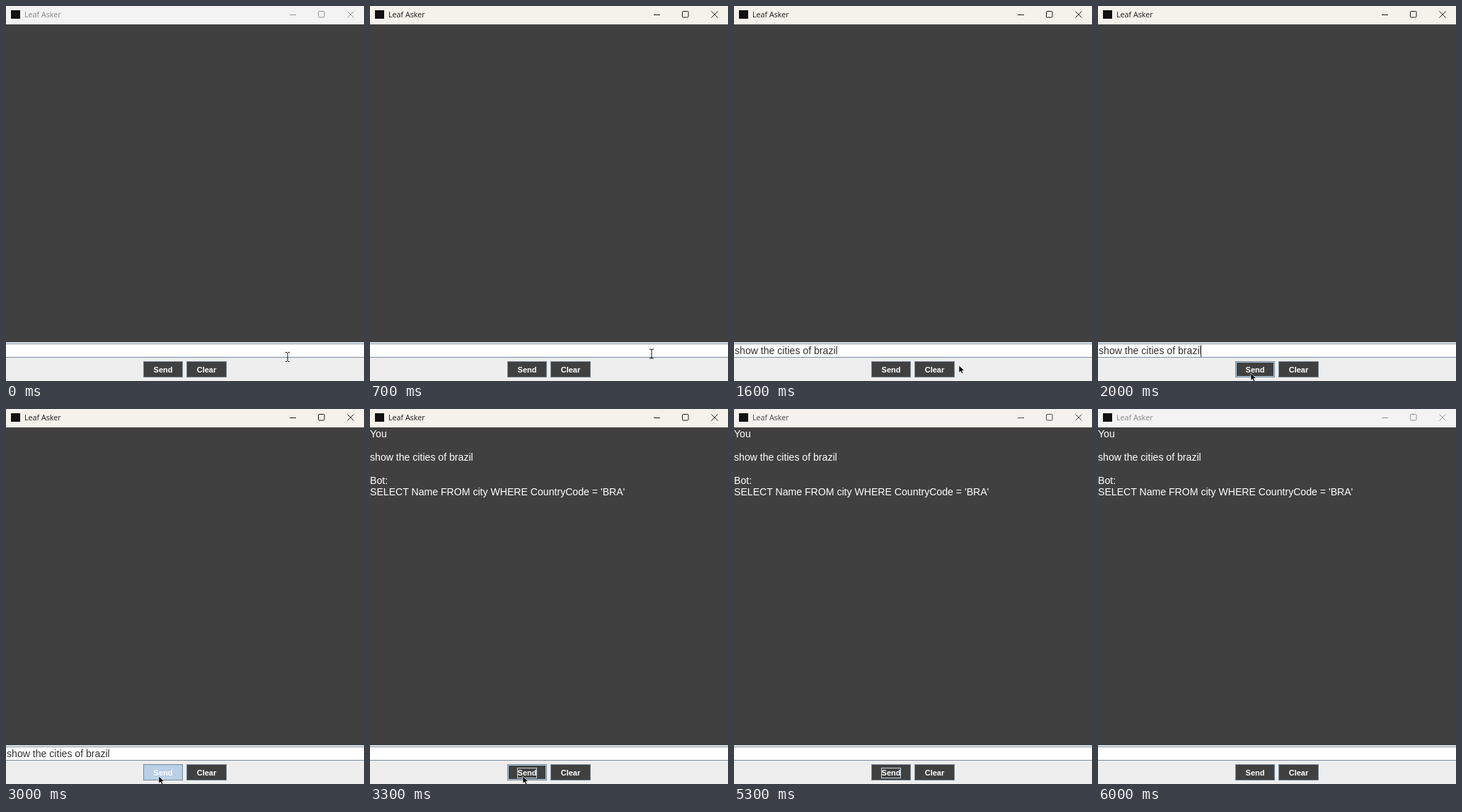
An HTML page that plays this animation: 506x530 px, repeating every 8 s.

```html
<!DOCTYPE html>
<html lang="en">
<head>
<meta charset="utf-8">
<title>Leaf Asker</title>
<style>
  html, body { margin: 0; width: 100%; height: 100%; overflow: hidden; background: #eee; }
  svg { display: block; width: 506px; height: 530px; }
  text { white-space: pre; }
  .title { font: 10.7px "Open Sans", "Noto Sans", sans-serif; }
  .body { font: 14.1px "Liberation Sans", Arial, sans-serif; }
  .label { font: bold 11px "Liberation Sans", Arial, sans-serif; fill: #fff; text-anchor: middle; }
  .line { fill: none; stroke-width: 1; }
  .crisp { shape-rendering: crispEdges; }
</style>
</head>
<body>
<svg viewBox="0 0 506 530">
  <defs>
    <g id="chrome">
      <text class="title" x="26" y="16.3">Leaf Asker</text>
      <g class="line" stroke="currentColor">
        <path d="M401 12.5h9"/>
        <rect x="441.5" y="7.5" width="8.5" height="8.5" rx="1.2"/>
        <path d="M482.5 7.5l9 9M491.5 7.5l-9 9"/>
      </g>
    </g>
  </defs>

  <rect width="506" height="27" fill="#f3f3f3"/>
  <use href="#chrome" color="#929292" fill="#858585"/>
  <g id="active">
    <rect width="506" height="27" fill="#f5f1eb"/>
    <use href="#chrome" color="#1b1b1b" fill="#1b1b1b"/>
  </g>
  <rect x="7" y="6" width="13" height="12" fill="#111"/>

  <g class="crisp">
    <rect y="26" width="506" height="449" fill="#404040"/>
    <rect y="475" width="506" height="1" fill="#b8cfe5"/>
    <rect y="476" width="506" height="1" fill="#fff"/>
    <rect y="477" width="506" height="1" fill="#7a8a99"/>
    <rect y="478" width="506" height="18" fill="#fff"/>
    <rect y="496" width="506" height="1" fill="#7a8a99"/>
    <rect y="497" width="506" height="33" fill="#eee"/>
  </g>

  <g id="chat" class="body" fill="#fff"></g>
  <text id="query" class="body" x="1" y="492" fill="#333">show the cities of brazil</text>
  <rect id="caret" class="crisp" y="479" width="1" height="17" fill="#333"/>

  <g id="buttons"></g>

  <path id="ibeam" class="line" stroke="#111" d="M-3 -6.5H-1L0 -5.5L1 -6.5H3M0 -5.5V5.5M-3 6.5H-1L0 5.5L1 6.5H3"/>
  <path id="arrow" fill="#000" stroke="#fff" stroke-width=".6"
        d="M0 0V10.2L2.4 8L4 11.6L5.8 10.8L4.2 7.3H7.4Z"/>
</svg>

<script>
const LOOP = 8000;
const $ = id => document.getElementById(id);

function add(parent, tag, attrs, text = '') {
  const el = document.createElementNS('http://www.w3.org/2000/svg', tag);
  for (const key in attrs) el.setAttribute(key, attrs[key]);
  el.textContent = text;
  parent.appendChild(el);
  return el;
}

const lines = ['You', '', 'show the cities of brazil', '', 'Bot:',
  "SELECT Name FROM city WHERE CountryCode = 'BRA'"];
lines.forEach((s, i) => s && add($('chat'), 'text', { x: 0, y: Math.round(40 + i * 16.4) }, s));

function makeButton(x, w, name) {
  const g = add($('buttons'), 'g', {});
  const box = (dx, y, bw, h, attrs) =>
    add(g, 'rect', { class: 'crisp', x: x + dx, y, width: bw, height: h, ...attrs });
  const face = box(0.5, 502.5, w - 1, 22, { stroke: '#7a8a99' });
  const glow = box(1.5, 503.5, w - 3, 20, { fill: 'none', stroke: '#b8cfe5' });
  add(g, 'text', { class: 'label', x: x + w / 2, y: 518 }, name);
  const focus = box(14.5, 507.5, w - 29, 14, { fill: 'none', stroke: '#c4d5e5' });
  return { x, w, face, glow, focus };
}
const send = makeButton(194, 56, 'Send');
const clear = makeButton(255, 57, 'Clear');

// [start ms, value] steps; each value holds until the next one
const activity = [[0, 0], [100, 0.5], [200, 1], [5300, 0.6], [5400, 0.25], [5500, 0]];
const caretX = [[0, null], [200, 1], [700, null], [1100, 145], [1600, null], [2000, 145], [2600, null]];
const pointer = [[0, [398, 496]], [200, [398, 491.5]], [1400, [391, 494]], [1500, [362, 501]],
  [1600, [318, 508]], [1700, [272, 514]], [1800, [238, 517]], [1900, [222, 518.5]],
  [2000, [216, 519]], [4000, [290, 517]], [4100, [459, 522]], [4200, null]];

const at = (steps, t) => steps.reduce((v, [start, value]) => t >= start ? value : v, null);
const within = (t, a, b) => t >= a && t < b;
const show = (el, on) => el.setAttribute('visibility', on ? 'visible' : 'hidden');

function paintButton(b, pos, pressed, focused) {
  const over = pos && within(pos[0], b.x, b.x + b.w) && within(pos[1], 502, 525);
  b.face.setAttribute('fill', pressed ? '#b8cfe5' : '#404040');
  show(b.glow, over && !pressed);
  show(b.focus, focused);
}

function draw(t) {
  const pos = at(pointer, t);
  const cx = at(caretX, t);
  $('active').setAttribute('opacity', at(activity, t));
  show($('query'), within(t, 1100, 3300));
  show($('chat'), t >= 3300);
  show($('caret'), cx !== null);
  if (cx !== null) $('caret').setAttribute('x', cx);
  paintButton(send, pos, within(t, 2700, 3300), within(t, 2700, 5400));
  paintButton(clear, pos, false, false);

  const typing = pos && pos[1] < 497;
  show($('ibeam'), typing);
  show($('arrow'), pos && !typing);
  if (pos) $(typing ? 'ibeam' : 'arrow').setAttribute('transform', `translate(${pos})`);
}

const begin = performance.now();
function tick(now) {
  draw(Math.max(0, now - begin) % LOOP);
  requestAnimationFrame(tick);
}
draw(0);
requestAnimationFrame(tick);
</script>
</body>
</html>
```
